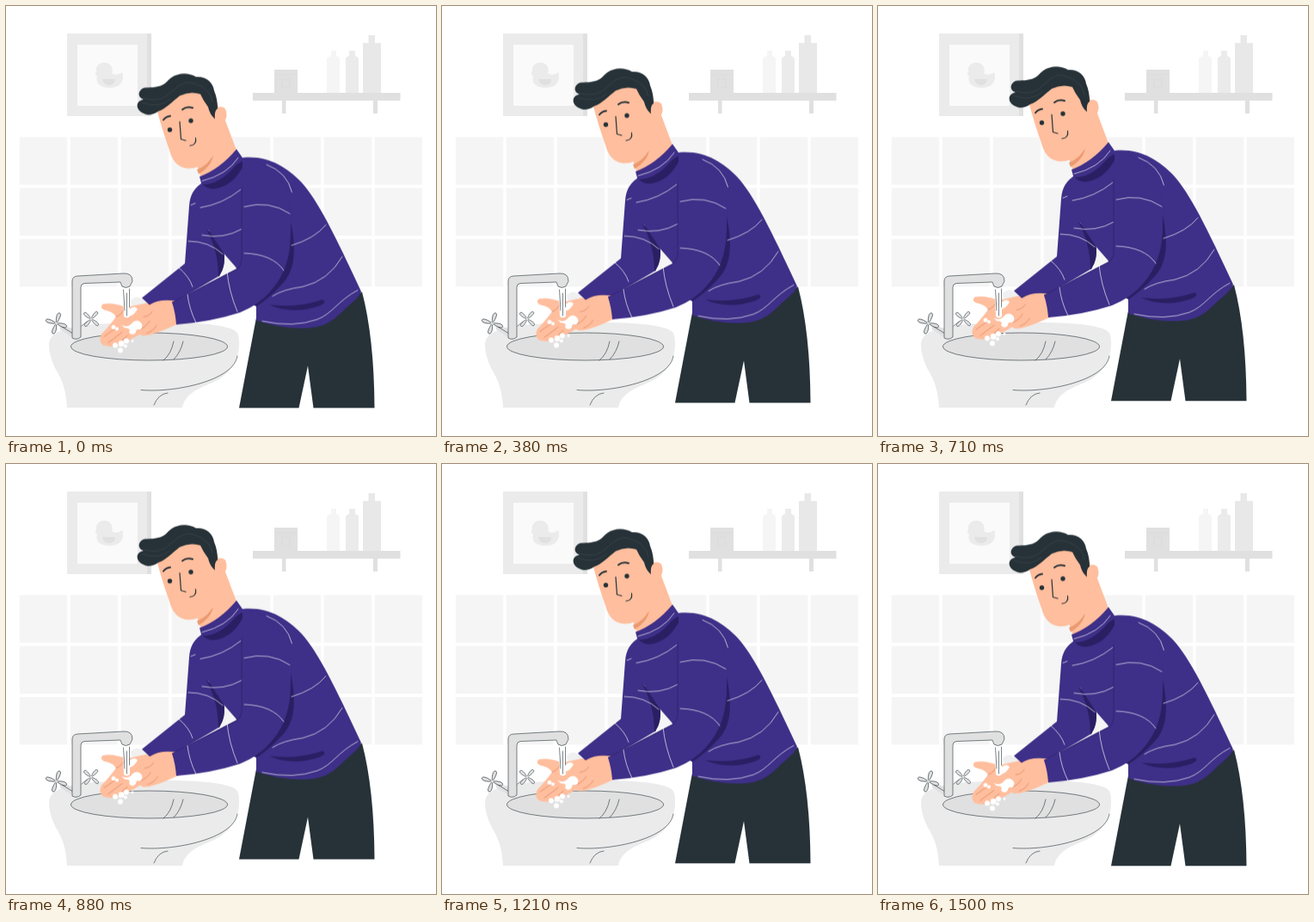
Recreate the animation shown at these times as an HTML page. Size 500 px wide and 500 px high, loop 1540 ms.

```html
<!DOCTYPE html>
<html lang="en">
<head>
<meta charset="utf-8">
<title>Washing hands</title>
<style>
html, body { margin: 0; width: 100%; height: 100%; overflow: hidden; background: #fff; }
svg { display: block; width: 100vw; height: 100vh; }
.bob { animation: bob 1540ms infinite; }
.rub { animation: rub 1540ms infinite; }
@keyframes bob {
  0% { transform: translateY(.4px); animation-timing-function: cubic-bezier(.39, .575, .565, 1); }
  50% { transform: translateY(-7.8px); animation-timing-function: cubic-bezier(.445, .05, .55, .95); }
  100% { transform: translateY(.4px); }
}
@keyframes rub {
  0%, 100% { transform: translateX(0); animation-timing-function: ease-in-out; }
  50% { transform: translateX(1.2px); animation-timing-function: ease-in-out; }
}
.line { fill: none; stroke: #263238; stroke-width: .6; stroke-linecap: round; stroke-linejoin: round; }
.face { stroke-width: 1.2; }
.brow { stroke-width: 2; }
.metal { fill: #e0e0e0; stroke: #263238; stroke-width: .6; stroke-linejoin: round; }
.knit { fill: #3e2f88; }
.shade { fill: #2a1f63; }
.stripe { fill: none; stroke: #fff; stroke-width: .65; stroke-linecap: round; }
.skin { fill: #ffbe9d; }
.crease { fill: none; stroke: #d98460; stroke-width: .7; stroke-linecap: round; }
.dark { fill: #263238; }
</style>
</head>
<body>
<svg viewBox="0 0 500 500">
  <defs>
    <pattern id="tiles" x="15.700" y="152.200" width="59" height="59.400" patternUnits="userSpaceOnUse">
      <rect width="55.500" height="55.700" fill="#f5f5f5"/>
    </pattern>
    <g id="knob" class="metal">
      <path id="petal" d="M0 0C-2-4-4-11-1-12.500C2.500-13.500 2-6 0 0Z"/>
      <use href="#petal" transform="rotate(90)"/>
      <use href="#petal" transform="rotate(180)"/>
      <use href="#petal" transform="rotate(270)"/>
      <circle r="1.500" stroke="none"/>
    </g>
  </defs>

  <!-- wall -->
  <rect x="15.700" y="152.200" width="468.600" height="174.500" fill="url(#tiles)"/>
  <path d="M71 32H169V128H71Z" fill="#ebebeb"/>
  <path d="M164 32H169V128H164Z" fill="#e0e0e0"/>
  <path d="M83 45H153V116H83Z" fill="#fafafa"/>
  <path d="M106 82C104 80 103 78 105 76C103 65 119 62 123 71C124 74 124 76 123 78C127 81 131 80 135 77C138 84 135 95 121 95C108 95 104 89 106 82Z" fill="#ebebeb"/>
  <path d="M112 85H127C127 94 114 95 112 85Z" fill="#e0e0e0"/>
  <g fill="#e0e0e0">
    <path d="M287 101H458.500V110H432V125H427V110H325.500V125H321V110H287Z"/>
    <path d="M312 74H339V101H312Z"/>
  </g>
  <path d="M313 80H338M321 84Q326 88 330 83V95H321Z" fill="none" stroke="#d9d9d9" stroke-width=".7"/>
  <path d="M373 101V62Q373 59 378 58V52H384V58Q388 59 388 62V101Z" fill="#f5f5f5"/>
  <path d="M395 101V62Q395 59 399 58V52H406V58Q410 59 410 62V101Z" fill="#ebebeb"/>
  <path d="M415 101V43H421.500V34H429V43H436V101Z" fill="#e8e8e8"/>

  <!-- sink -->
  <path d="M50 393C51 378 72 370 130 369C190 367 255 367 268 379Q271 383 271 390C272 410 262 428 240 438C222 445 208 452 205 467H71C70 450 67 439 61 428C54 416 50 405 50 393Z" fill="#ebebeb"/>
  <ellipse cx="166.500" cy="396" rx="91" ry="16" class="metal"/>
  <path class="line" d="M157 446.500C195 450 265 436 269 407M172 464Q177 451 188 450M183 412Q192 405 195 390M195 411Q203 403 206 390"/>
  <path d="M62 369L80 377V387L63 376Z" fill="#e0e0e0"/>
  <path class="line" d="M65 373L78 381M88 372L94 367"/>
  <use href="#knob" transform="translate(58.500 369) rotate(20)"/>
  <use href="#knob" transform="translate(99 364) rotate(44) scale(.87)"/>
  <path class="metal" d="M77 386V320Q77 314.500 83 314L136 311Q147 310 147 320L144 326Q139 329 135 326L133 321L91 322.500Q87 323 87 327V385Q82 389 77 386Z"/>

  <!-- legs, back arm, torso -->
  <g class="bob">
    <path class="dark" d="M291 362L271 467H340.500L351 418L357.500 467H428.500Q428 385 414 332L380 350Z"/>
    <path d="M145 342Q151 335 158 340Q167 341 168 349Q157 357 147 351Z" fill="#f0f0f0"/>
    <path class="skin" d="M163 345L140 350Q125 344 113 346Q108 350 114 353Q125 355 128 361Q119 373 111 381Q107 389 113 394Q124 398 136 391Q151 386 168 372L184 350Z"/>
    <path class="crease" d="M138 350Q136 358 128 361M114 384L128 374M119 391L135 379M128 394L141 383"/>
    <path class="shade" d="M232 255L252 287Q257 299 248 314L236 312Z"/>
    <path class="knit" d="M230 204Q214 213 213 232L208 299L158 339Q166 346 171 352L193 346L247 314Q251 285 234 259L275 250V200Z"/>
    <path class="shade" d="M233 259Q249 269 254 289Q255 304 247 314Q247 284 233 259Z"/>
    <path class="skin" d="M222 185L238 135L254 130L269 170Q258 194 228 202Z"/>
    <path d="M222 190Q236 184 241 172Q240 185 224 195Z" fill="#eb9a70"/>
    <path class="knit" d="M225 198Q249 189 268 166L275 176C305 173 326 187 343 204C363 226 382 265 413 331.500C411 338 403 344 395 351C385 361 376 370 360 373C335 377 308 371 291 365V345L267 303L253 287L234 258L216 227L228 209Z"/>
    <path class="shade" d="M229 207Q249 207 267 185L274 180Q277 183 275 187Q263 209 243 212Q234 213 229 207Z"/>
    <path class="shade" d="M331 250C339 290 334 310 320 324Q305 340 291 349L285 345L325 286Z"/>
    <path class="shade" d="M306 347Q340 351 368 341Q374 344 365 348Q334 359 306 347Z"/>
    <path class="stripe" d="M228 203Q257 196 270 176M226 234Q252 230 273 213M215 231L220 229M228 266Q253 271 274 259M212 273Q236 273 252 288M332 278Q359 270 372 254M391 291Q375 319 345 326Q322 329 310 337M298 366Q334 374 362 364C380 357 386 342 409 330M201 304Q213 314 217 326"/>

    <!-- head -->
    <path class="skin" d="M175 119Q183 148 190 167Q195 187 211 188.500Q227 189 241 174L259 152L244 108L222 92Z"/>
    <path class="skin" d="M243 120Q249 114 255 119Q260 132 249 136Z"/>
    <path class="dark" d="M165 126C157 125 151 119 153 113C155 109 158 109 160 108C155 107 153 102 156 98C160 92 168 96 177 93C184 92 187 87 192 83C201 77 212 77 221 82C233 81 241 89 242 98C245 105 246 112 246 119Q242 121 243 131Q237 126 235 117Q229 109 226 102Q214 98 202 104C193 111 186 119 177 122Q172 126 165 126Z"/>
    <path d="M160 107Q180 113 193 99Q207 84 220 90Q238 96 240 111M158 112Q178 119 191 108" fill="none" stroke="#455057" stroke-width=".5"/>
    <circle class="dark" cx="190.500" cy="143.500" r="2.700"/>
    <circle class="dark" cx="215" cy="133" r="2.700"/>
    <path class="line face" d="M202 134L203.500 154.500L209 156M214 162Q222 161 220.500 153"/>
    <path class="line brow" d="M183 132Q186 128 191 127.500M205 120Q210 116 217 118"/>
  </g>

  <!-- water -->
  <path d="M135.500 328H144V361Q140 364 137 361Z" fill="#fff"/>
  <path class="line" d="M136.500 330L138 354M140.500 334V360M143.500 329V350"/>

  <!-- front arm, hand and foam -->
  <g class="bob">
    <path class="skin rub" d="M200 343Q179 339 167 347L149 356Q145 360 150 363L160 361L152 375Q152 381 159 383Q171 383 200 369Z"/>
    <path class="crease rub" d="M160 361Q166 361 170 355M155 376Q163 373 167 366M164 380Q172 377 175 371"/>
    <g fill="#fff">
      <path d="M134 370Q140 374 145 370Q151 363 156 367Q161 371 156 376Q151 374 151 379Q147 384 143 379Q146 374 138 374Z"/>
      <path d="M144 352Q150 347 153 352Q149 359 144 360Z"/>
      <circle cx="125" cy="373" r="2.500"/>
      <circle cx="129" cy="375" r="2"/>
      <circle cx="127" cy="394" r="3"/>
      <circle cx="134" cy="392" r="3.500"/>
      <circle cx="140" cy="389" r="3"/>
      <circle cx="133" cy="400" r="3"/>
      <circle cx="139" cy="395" r="2"/>
      <circle cx="147" cy="389" r="1.500"/>
    </g>
    <path class="knit" d="M275 177Q304 180 323 207Q333 230 331 262C331 290 325 312 307 332Q294 347 272 356Q238 367 198 370Q197 356 193 344L268 305L274 296Z"/>
    <path d="M274 210V294Q274 302 268 306L193 344" fill="none" stroke="#2a1f63" stroke-width=".6"/>
    <path class="stripe" d="M303 184Q327 193 332.500 216M277 233Q306 225 330 241M277 287Q310 288 323 307M257 308Q259 331 269 355M211 335Q213 352 221 368"/>
  </g>
</svg>
</body>
</html>
```
